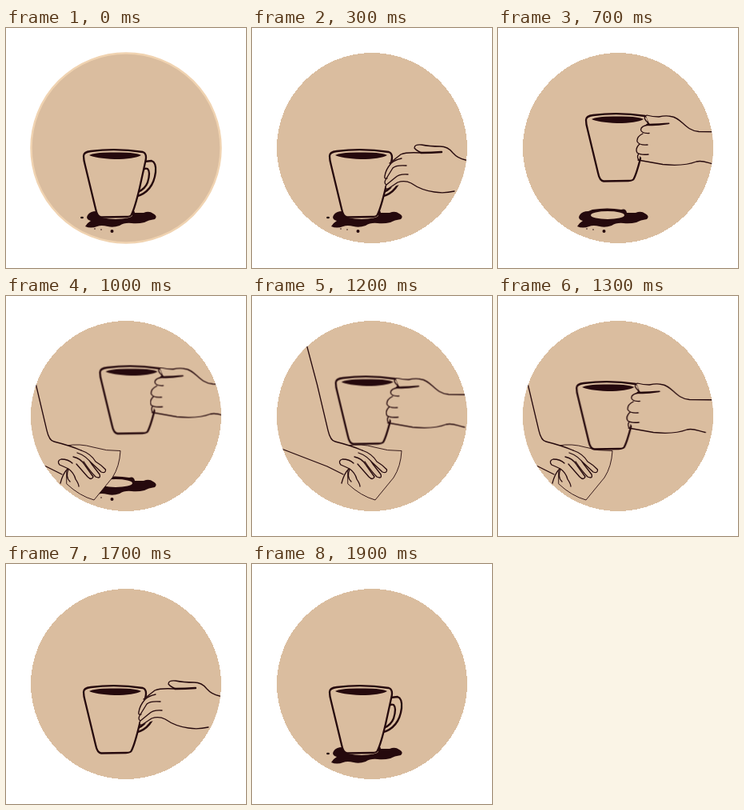
Recreate the animation shown at these times as an HTML page without scripts. Size 300 by 300 pixels, loop 2000 ms.

```html
<!DOCTYPE html>
<html lang="en">
<head>
<meta charset="utf-8">
<title>Coffee cup and spill</title>
<style>
  :root { --skin: #dabd9f; --ink: #25090d; }
  html, body { margin: 0; width: 100%; height: 100%; overflow: hidden; background: #fff; }
  svg { display: block; width: 100%; height: 100%; }

  .line, .shape { stroke: var(--ink); stroke-width: 1.3; stroke-linecap: round; stroke-linejoin: round; }
  .line { fill: none; }
  .shape { fill: var(--skin); }
  .ink { fill: var(--ink); }
  .bold { stroke-width: 2.3; }
  .fine { stroke-width: .9; }
  .skin { fill: var(--skin); }

  /* Everything moves at ten poses a second */
  .rim, .rest, .drip, .spill, .lift, .grip, .reach, .wipe { animation: 2s step-end infinite; }
  .rim { animation-name: rim; }
  .rest { animation-name: rest; }
  .drip { animation-name: drip; }
  .spill { animation-name: spill; transform-origin: 140px 236px; }
  .lift { animation-name: lift; }
  .grip { animation-name: grip; }
  .reach { animation-name: reach; }
  .wipe { animation-name: wipe; }

  @keyframes rim { 0% { opacity: 1 } 5%, 100% { opacity: 0 } }
  @keyframes rest { 0% { opacity: 1 } 20% { opacity: 0 } 85%, 100% { opacity: 1 } }
  @keyframes grip { 0% { opacity: 0 } 20% { opacity: 1 } 85%, 100% { opacity: 0 } }
  @keyframes drip { 0% { opacity: 1 } 55%, 100% { opacity: 0 } }
  @keyframes spill {
    0% { opacity: 1; transform: none }
    55% { opacity: 0; transform: none }
    90% { opacity: 1; transform: scale(.8) }
    95%, 100% { opacity: 1; transform: none }
  }
  @keyframes lift {
    0% { transform: translate(0, 0) }
    20% { transform: translate(0, 0); animation-timing-function: steps(3) }
    35% { transform: translate(13px, -45px); animation-timing-function: steps(3) }
    50% { transform: translate(20.5px, -64.5px); animation-timing-function: steps(3) }
    65% { transform: translate(1.2px, -45px); animation-timing-function: steps(2) }
    75% { transform: translate(-2px, -9px) }
    80%, 100% { transform: translate(0, 0) }
  }
  @keyframes reach {
    0% { transform: translate(140px, 0) }
    5% { transform: translate(56px, -8px); animation-timing-function: steps(2) }
    15% { transform: translate(0, 0) }
    20% { transform: translate(140px, 0) }
    85% { transform: translate(0, 0) }
    90% { transform: translate(40px, -12px) }
    95%, 100% { transform: translate(140px, 0) }
  }
  @keyframes wipe {
    0% { transform: translate(-190px, 0) }
    40% { transform: translate(-60px, -10px); animation-timing-function: steps(2) }
    50% { transform: translate(0, 0) }
    55% { transform: translate(57px, 0) }
    60% { transform: translate(44px, 0) }
    65% { transform: translate(0, 0); animation-timing-function: steps(2) }
    75% { transform: translate(-67px, -11px) }
    80%, 100% { transform: translate(-190px, 0) }
  }
</style>
</head>
<body>
<svg viewBox="0 0 300 300">
  <clipPath id="disc"><circle cx="150" cy="150" r="119"/></clipPath>
  <circle class="skin" cx="150" cy="150" r="119" shape-rendering="crispEdges"/>
  <circle class="rim" cx="150" cy="150" r="118.5" fill="none" stroke="#f0d3b1" stroke-width="2.5"/>

  <g clip-path="url(#disc)">
    <g class="spill">
      <path class="ink" d="M102 234 Q105 229 113 229 L118 227 Q137 224 154 227 Q160 225 161 231 L172 231 Q179 228 184 232
        Q190 235 186 239 Q178 240 173 243 Q165 245 157 244 Q148 243 142 247 Q134 250 127 248
        Q119 246 114 248 Q106 251 99 248 Q101 244 106 241 Q99 239 102 234Z"/>
      <ellipse class="skin" cx="137" cy="234" rx="21" ry="5"/>
      <ellipse class="ink rest" cx="95" cy="237" rx="2" ry="1.3"/>
    </g>
    <g class="ink drip">
      <circle cx="132.5" cy="254" r="2"/>
      <circle cx="111" cy="251" r=".8"/>
      <circle cx="119" cy="252" r=".8"/>
    </g>

    <!-- wiping hand with cloth -->
    <g class="wipe">
      <path class="shape fine" d="M76 187 Q92 184 109 189 Q125 194 143 193.500 Q142 213 133 227 L110 255 Q92 250 76 235Z"/>
      <path class="skin" d="M16 30 L37.500 111 L51 168 Q54 181 60 182 Q80 187 94 193 L108 203 L96 218 L77 216 L70 224 L50 213 L-20 186Z"/>
      <path class="line" d="M16 30 L37.500 111 L51 168 Q54 181 60 182 Q80 187 94 193 M-20 186 L50 213 Q62 219 70 223 M77 216 Q71 222 68 234"/>
      <path class="shape" d="M94 193 Q106 197 112 207 Q119 211 124.500 217 Q125 222 119 220 L104 206"/>
      <path class="shape" d="M89 196 Q101 200 107 210 L117 223 Q119 229 112 226 Q105 219 97 207"/>
      <path class="shape" d="M84 201 Q94 203 99 212 L109 226 Q107 231 102 226 L88 210"/>
      <path class="shape" d="M83 209 Q78 204 69 204 Q63 206 67 211 Q74 214 78 216 Q85 221 87 229 Q91 235 91 238 M78 216 Q74 227 80 232"/>
    </g>

    <g class="lift">
      <g class="rest">
        <path class="shape bold" d="M173 167 L182 166 Q188 168 187 180 Q184 205 162 211"/>
        <path class="line bold" d="M165 205 L170 181 Q172 174 177 176 Q181 180 177 193 Q174 201 165 205Z"/>
      </g>
      <path class="shape bold" d="M97 160 Q97 155 106 154 Q138 150 171 155 Q177 157 174 168
        L167 200 Q161 225 157 233 Q156 236 150 236 L119 236.500 Q114 236 112 226 L99 172 Q97 165 97 160Z"/>
      <path class="ink" d="M104 159 Q111 155 136 155.500 Q162 155 169 159 Q160 164 136 164 Q112 163 104 159Z"/>
      <!-- gripping hand -->
      <g class="grip">
        <path class="skin" d="M172 155 L198 155 L213 160 L224 170 L282 175 L282 218 L253 214 L238 211 L217 216
          L168 210 L163 203 L161 185 L165 170 L176 165Z"/>
        <path class="line" d="M282 175 L238 174.500 C220 173 217 157 203 155.500 Q197 154 188 156 Q180 156 173 154
          Q168 156 172 161 L176 165 M258 215.500 C247 213 243 210 235 212 C222 217 208 217 193 215.500 L162 210"/>
        <path class="ink" d="M172 165 Q190 164 201 163.500 Q203 165 198 165.500 Q184 168 173 167Z"/>
        <path class="line" d="M176 166 Q166 167 165.500 172 Q166 177 176 176.500
          M168 177 Q160 181 161 187 Q164 192 174 191 M164 190 Q158 196 161 201 Q165 204 175 203 M163 202 Q160 206 163 210"/>
      </g>
    </g>

    <!-- reaching hand -->
    <g class="reach">
      <path class="skin" d="M300 168 L268 165 L255 160 L243 148 L206 146 L203 150 L210 156 L186 157 L174 167 L166 184 L165 193
        L168 201 L184 196 L200 196 L216 203 L253 204 L300 205Z"/>
      <path class="line" d="M300 168 L267 165 Q257 163 251 156 Q245 148 235 148 Q222 148 212 146 Q203 145 203 150
        Q206 154 213 156 M210 156 Q193 155 186 158 L172 169"/>
      <path class="line bold" d="M211 156 Q224 156 237 155"/>
      <path class="line" d="M187 163 Q178 165 174 169 Q167 177 166 185 Q165 189 169 188
        M193 172 Q180 171 176 175 L168 188 Q164 194 168 196 M195 183 Q184 182 179 187 L168 196 Q165 202 170 201
        L182 193 Q191 190 199 194 Q212 203 228 205 Q240 207 253 204"/>
    </g>
  </g>
</svg>
</body>
</html>
```
